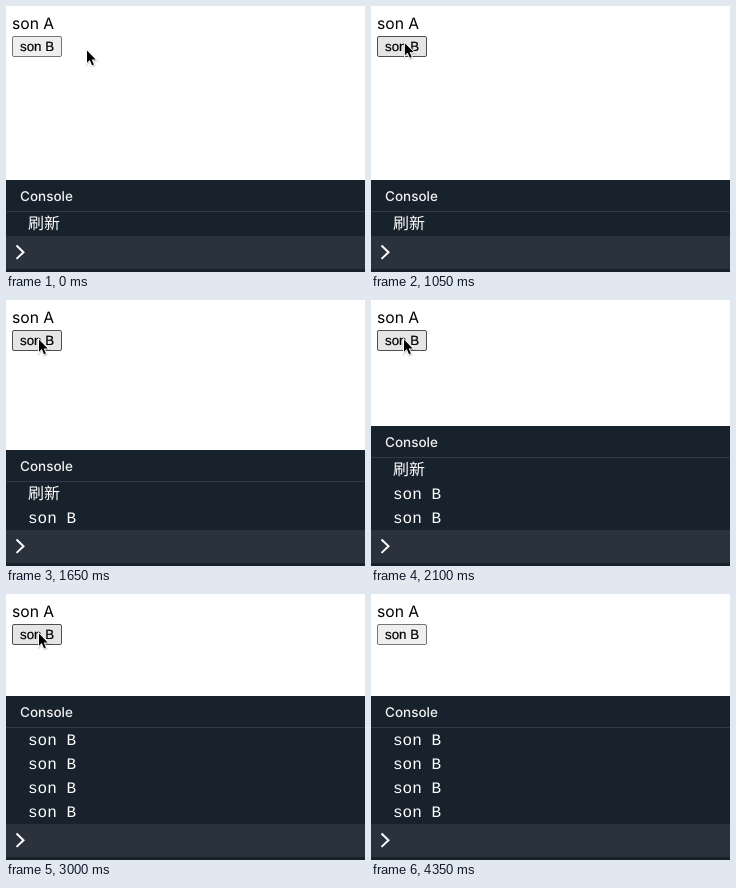
These frames come from a looping animation (359x266 px, 4.68 s). An HTML page:

```html
<!DOCTYPE html>
<html lang="zh">
<head>
<meta charset="utf-8">
<title>Console demo</title>
<style>
  html, body { margin: 0; width: 100%; height: 100%; overflow: hidden; background: #fff; }
  svg { display: block; font: 15.7px Inter, sans-serif; text-rendering: geometricPrecision; }
  #button text { font: 13.333px "Liberation Sans", Arial, sans-serif; stroke: #000; stroke-width: .2; }
  #console text { fill: #fff; }
  #console .title { font-size: 13.5px; font-weight: 500; fill: #f0f0f0; }
  #console .log { font: 16px "Liberation Mono", "Courier New", "Noto Sans CJK SC", "Noto Sans CJK", monospace; }
</style>
</head>
<body>
<svg width="359" height="266" viewBox="0 0 359 266">
  <defs><path id="arrow" d="M1 1.6v12.2l2.8-2.7 2.2 5.1 1.9-.8-2.2-5h4z"/></defs>
  <text x="6" y="23">son A</text>
  <g id="button">
    <rect x="6.5" y="30.5" width="49" height="20" rx="1.5"/>
    <text x="14" y="45">son B</text>
  </g>
  <g id="console">
    <g id="header">
      <rect width="359" height="266" fill="#18222d"/>
      <rect y="31" width="359" height="1" fill="#303a46"/>
      <text class="title" x="14" y="21">Console</text>
    </g>
    <g id="rows"></g>
    <rect y="230" width="359" height="33" fill="#2a323e"/>
    <rect y="263" width="359" height="3" fill="#18222d"/>
    <path d="M10.5 239.5l7 6.7-7 6.7" fill="none" stroke="#fff" stroke-width="2"/>
  </g>
  <g id="cursor">
    <use href="#arrow" x=".2" y=".8" stroke="#0002" stroke-width="2.8"/>
    <use href="#arrow" stroke="#fff" stroke-width="1.8" paint-order="stroke"/>
  </g>
</svg>
<script>
const LOOP = 4680, TICK = 150;
const ROW = 24, MAX_ROWS = 4, LIST_BOTTOM = 230, HEADER = 32;
const FIRST_CLICK = 1500, CLICK_GAP = 450, CLICKS = 4, TOO_BRIEF = 1;
const HOVER_FROM = 750, HOVER_TO = 3600, EXIT = 4350;

// Pointer stops; each is approached with an ease-out of the given power
const stops = [
  { t: 0, x: 80, y: 43 },
  { t: 150, x: 104, y: 43 },
  { t: 300, x: 104, y: 43 },
  { t: 450, x: 76, y: 43 },
  { t: 900, x: 34, y: 32.5, power: 2 },
  { t: 1350, x: 32, y: 38, power: 2 },
  { t: 3450, x: 32, y: 38 },
  { t: 3750, x: 231, y: 180 },
  { t: 4200, x: 331, y: 264, power: 1.5 }
];

const $ = id => document.getElementById(id);
const face = document.querySelector('#button rect');
const move = (el, x, y) => el.setAttribute('transform', `translate(${x} ${y})`);
const mix = (a, b, p) => a + (b - a) * p;
let shown = -1;

function pointerAt(t) {
  const next = stops.findIndex(stop => stop.t > t);
  if (next < 0) return stops.at(-1);
  const a = stops[next - 1], b = stops[next];
  const p = 1 - (1 - (t - a.t) / (b.t - a.t)) ** (b.power ?? 1);
  return { x: mix(a.x, b.x, p), y: mix(a.y, b.y, p) };
}

function drawButton(t) {
  const click = Math.floor((t - FIRST_CLICK) / CLICK_GAP);
  const held = t - FIRST_CLICK - click * CLICK_GAP < TICK;
  const pressed = held && click >= 0 && click < CLICKS && click !== TOO_BRIEF;
  const hovered = t >= HOVER_FROM && t < HOVER_TO;
  const [fill, stroke] = pressed ? ['#f5f5f5', '#8d8d8d']
    : hovered ? ['#e5e5e5', '#4f4f4f'] : ['#efefef', '#767676'];
  face.setAttribute('fill', fill);
  face.setAttribute('stroke', stroke);
}

function drawLogs(t) {
  const released = Math.floor((t - FIRST_CLICK - TICK) / CLICK_GAP) + 1;
  const count = Math.max(0, Math.min(CLICKS, released));
  if (count === shown) return;
  shown = count;
  const logs = ['刷新', ...Array(count).fill('son B')].slice(-MAX_ROWS);
  const top = LIST_BOTTOM - logs.length * ROW;
  move($('header'), 0, top - HEADER);
  $('rows').innerHTML = logs.map((log, i) =>
    `<text class="log" x="22" y="${top + i * ROW + 17}">${log}</text>`
  ).join('');
}

function draw(time) {
  const t = Math.floor(time / TICK) * TICK;
  const { x, y } = pointerAt(t);
  move($('cursor'), x, y);
  $('cursor').setAttribute('visibility', t < EXIT ? 'visible' : 'hidden');
  drawButton(t);
  drawLogs(t);
}

const start = performance.now();
function frame() {
  draw((performance.now() - start) % LOOP);
  requestAnimationFrame(frame);
}
frame();
</script>
</body>
</html>
```
